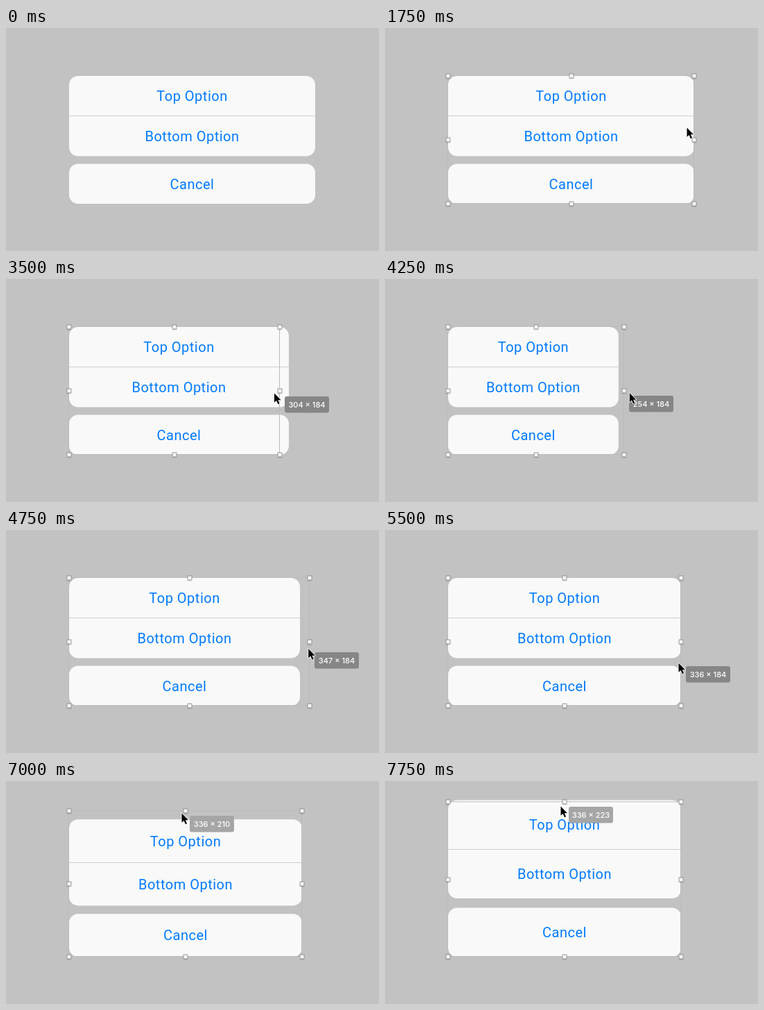
Write an HTML page that moves like this. It is 538x321 px and loops after 8 s.

```html
<!DOCTYPE html>
<html lang="en">
<head>
<meta charset="utf-8">
<title>Resizing an action sheet</title>
<style>
  html, body { margin: 0; width: 100%; height: 100%; overflow: hidden; background: #c2c2c2; }
  svg { display: block; width: 538px; height: 321px; }
  .card { fill: #f9f9f9; }
  .label { font: 20px Roboto, sans-serif; letter-spacing: .5px; fill: #007aff; text-anchor: middle; }
  .outline { fill: none; stroke: #bbb; }
  .handle rect { fill: #f4f4f4; stroke: #888; stroke-opacity: .6; stroke-width: 1.4; }
  .handle path { stroke: #000; stroke-opacity: .16; }
  #size { font: 500 11px Inter, sans-serif; fill: #fff; text-anchor: middle; }
</style>
</head>
<body>
<svg viewBox="0 0 538 321">
  <rect class="card" id="group" x="91" rx="13"/>
  <rect id="rule" x="91" height="1" fill="#cdcdcd"/>
  <rect class="card" id="cancel" x="91" rx="13"/>
  <text class="label">Top Option</text>
  <text class="label">Bottom Option</text>
  <text class="label">Cancel</text>
  <g id="selection"><path class="outline" id="outline"/></g>
  <g id="tip">
    <rect id="tipBox" width="64" height="23.5" rx="3"/>
    <text id="size" x="32" y="16">355 × 184</text>
  </g>
  <path id="arrow" d="M.5 .5V13.8L3.6 11 5.9 16.2 8 15.2 5.8 10.2H10Z"
        stroke="#fff" stroke-width="1.6" stroke-linejoin="round" paint-order="stroke"/>
</svg>
<script>
const LOOP = 8000, STEP = 250, LEFT = 91, BOTTOM = 253;
const LAG = 80;  // ms by which the cards trail the selection

// Turning points: [ms, value, ...], eased in between.
const width = [[3000, 355], [4066, 242], [5000, 368], [5400, 336]];
const height = [[6750, 184], [7200, 228], [7550, 228.5], [7800, 222]];
const mouse = [
  [500, 318, 236], [1500, 259, 119], [1750, 435, 143], [2000, 457, 160],
  [2750, 438, 166], [3000, 438, 166], [4000, 335, 162], [5000, 453, 172],
  [5500, 423, 191], [6750, 253, 68], [7000, 253, 46], [7400, 253, 30], [7750, 253, 36]
];

const $ = id => document.getElementById(id);
const labels = document.querySelectorAll('.label');
const ease = p => (1 - Math.cos(Math.PI * p)) / 2;

function set(el, attrs) {
  for (const k in attrs) el.setAttribute(k, attrs[k]);
}

function show(el, on) {
  el.setAttribute('visibility', on ? 'visible' : 'hidden');
}

function sample(keys, t) {
  const i = keys.findIndex(k => k[0] >= t);
  if (i < 0) return keys[keys.length - 1].slice(1);
  if (i === 0) return keys[0].slice(1);
  const a = keys[i - 1], b = keys[i], f = ease((t - a[0]) / (b[0] - a[0]));
  return a.slice(1).map((v, j) => v + (b[j + 1] - v) * f);
}

// Columns and rows 0, 1, 2; the middle of the frame has no handle.
const handles = [];
for (let row = 0; row < 3; row++) {
  for (let col = 0; col < 3; col++) {
    if (row === 1 && col === 1) continue;
    const el = document.createElementNS('http://www.w3.org/2000/svg', 'g');
    el.setAttribute('class', 'handle');
    el.innerHTML = '<rect x="-3" y="-3" width="6" height="6" rx=".5"/><path d="M-3 4H3"/>';
    $('selection').append(el);
    handles.push({ el, row, col });
  }
}

function drawCards(w, h) {
  const top = BOTTOM - h, k = h / 184;
  const groupH = 115.5 * k, cancelH = 57.5 * k, cancelY = BOTTOM - cancelH;
  set($('group'), { y: top, width: w, height: groupH });
  set($('rule'), { y: Math.floor(top + groupH / 2), width: w });
  set($('cancel'), { y: cancelY, width: w, height: cancelH });
  const middles = [top + groupH / 4, top + groupH * 3 / 4, cancelY + cancelH / 2];
  labels.forEach((el, i) => set(el, { x: LEFT + w / 2, y: middles[i] + 7.3 }));
}

function drawSelection(w, h) {
  const top = BOTTOM - h;
  set($('outline'), { d: `M90.5 252.5V${top - .5}H${LEFT + w - .5}V252.5Z` });
  for (const { el, row, col } of handles) {
    const x = Math.round(LEFT + w * col / 2), y = Math.round(top + h * row / 2);
    set(el, { transform: `translate(${x} ${y})` });
  }
}

function draw(t) {
  const [mx, my] = sample(mouse, t);
  const [w] = sample(width, t), [h] = sample(height, t);

  drawCards(...sample(width, t - LAG), ...sample(height, t - LAG));
  drawSelection(w, h);
  show($('selection'), t >= 1250);

  const wide = t > 3000 && t <= 5500, tall = t > 6750;
  const x = tall ? 264.5 : LEFT + w + 7;
  const y = tall ? BOTTOM - h + 7 : my + 5;
  show($('tip'), wide || tall);
  set($('tip'), { transform: `translate(${Math.round(x)} ${Math.round(y)})` });
  set($('tipBox'), { fill: tall ? '#a6a6a6' : '#868686' });
  $('size').textContent = `${Math.round(w)} × ${Math.round(h)}`;

  show($('arrow'), t >= 500);
  set($('arrow'), { transform: `translate(${mx} ${my})` });
}

const start = performance.now();
function tick() {
  const t = (performance.now() - start) % LOOP;
  draw(Math.floor(t / STEP) * STEP);
  requestAnimationFrame(tick);
}
tick();
</script>
</body>
</html>
```
